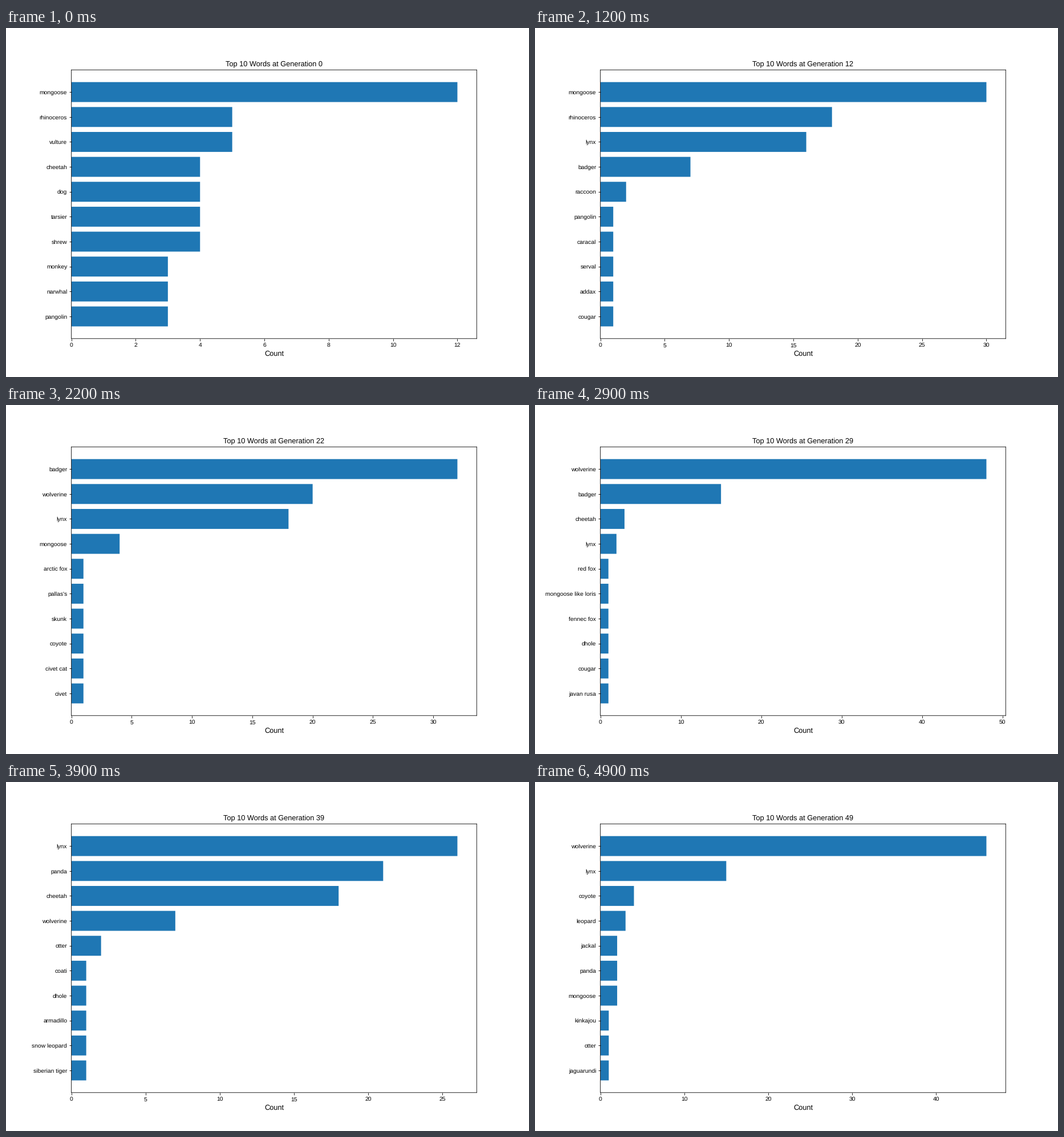
These frames come from a looping animation (917x611 px, 5000 ms). A matplotlib script:

```python
import math
import random

import matplotlib.pyplot as plt
from matplotlib.animation import FuncAnimation

WIDTH, HEIGHT, DPI = 917, 611, 76.4
GENERATIONS = 50
ROWS = 10
TRACE = 0.3  # weight of a word that is not yet, or no longer, in the ranking

# Soft, unsnapped edges and unhinted text.
plt.rcParams.update({
    "font.family": "Liberation Sans",
    "text.hinting": "none",
    "path.snap": False,
    "xtick.labelsize": 9.8,
    "ytick.labelsize": 9.8,
})

# Known rankings: words in order, then their counts; missing counts are 1.
RANKINGS = {
    0: ("mongoose,rhinoceros,vulture,cheetah,dog,tarsier,shrew,monkey,narwhal,pangolin",
        [12, 5, 5, 4, 4, 4, 4, 3, 3, 3]),
    7: ("mongoose,rhinoceros,raccoon,solifugid spider,addax,dugong,newt,zebra,pangolin,serval",
        [50, 17, 2]),
    16: ("lynx,badger,mongoose,rhinoceros,wolverine,iriomote wildcats,coyote,"
         "pallas's cat,sable antelope", [57, 12, 3, 3]),
    22: ("badger,wolverine,lynx,mongoose,arctic fox,pallas's,skunk,coyote,civet cat,civet",
         [32, 20, 18, 4]),
    29: ("wolverine,badger,cheetah,lynx,red fox,mongoose like loris,fennec fox,dhole,"
         "cougar,javan rusa", [48, 15, 3, 2]),
    39: ("lynx,panda,cheetah,wolverine,otter,coati,dhole,armadillo,snow leopard,"
         "siberian tiger", [26, 21, 18, 7, 2]),
    49: ("wolverine,lynx,coyote,leopard,jackal,panda,mongoose,kinkajou,otter,jaguarundi",
         [46, 15, 4, 3, 2, 2, 2]),
}
EARLY = "raccoon,addax,dugong,newt,zebra,serval,lemur,tapir,gecko,ibex".split(",")
LATE = "coyote,skunk,civet,dhole,cougar,ocelot,jackal,otter,caracal,iriomote wildcats".split(",")
EXOTIC = ["ring-tailed mongoose", "egyptian mongoose"]


def ranking(gen):
    words, counts = RANKINGS[gen]
    words = words.split(",")
    return dict(zip(words, counts + [1] * (len(words) - len(counts))))


def estimate(gen):
    """Geometric growth and decay of the leaders, padded with single finds."""
    before = max(g for g in RANKINGS if g < gen)
    after = min(g for g in RANKINGS if g > gen)
    t = (gen - before) / (after - before)
    old, new = ranking(before), ranking(after)
    both = list({**old, **new})
    leaders = [w for w in both if max(old.get(w, 0), new.get(w, 0)) > 1]

    weights = {w: math.exp((1 - t) * math.log(old.get(w, TRACE))
                           + t * math.log(new.get(w, TRACE))) for w in leaders}
    total = sum((1 - t) * old.get(w, 0) + t * new.get(w, 0) for w in leaders)
    scale = total / sum(weights.values())
    counts = {w: round(v * scale) for w, v in weights.items() if v * scale >= 0.5}

    pool = EARLY if gen < 7 else LATE + both
    if 19 <= gen < 43:
        pool = pool + EXOTIC
    spare = [w for w in dict.fromkeys(pool) if w not in leaders]
    missing = max(0, ROWS - len(counts))
    singles = random.Random(gen).sample(spare, min(missing, len(spare)))
    counts.update((w, 1) for w in singles)
    return dict(sorted(counts.items(), key=lambda item: -item[1])[:ROWS])


history = [ranking(g) if g in RANKINGS else estimate(g) for g in range(GENERATIONS)]

# The small margin keeps the pixel size from being rounded down.
fig, ax = plt.subplots(figsize=((WIDTH + 0.001) / DPI, (HEIGHT + 0.001) / DPI), dpi=DPI)


def draw(gen):
    ax.clear()
    counts = history[gen]
    ax.barh(list(counts), list(counts.values()), color="#1f77b4")
    ax.invert_yaxis()
    ax.set_xlabel("Count", fontsize=12)
    ax.set_title(f"Top 10 Words at Generation {gen}", fontsize=12)


animation = FuncAnimation(fig, draw, frames=GENERATIONS, interval=100,
                          repeat=True, repeat_delay=0)
plt.show()
```
